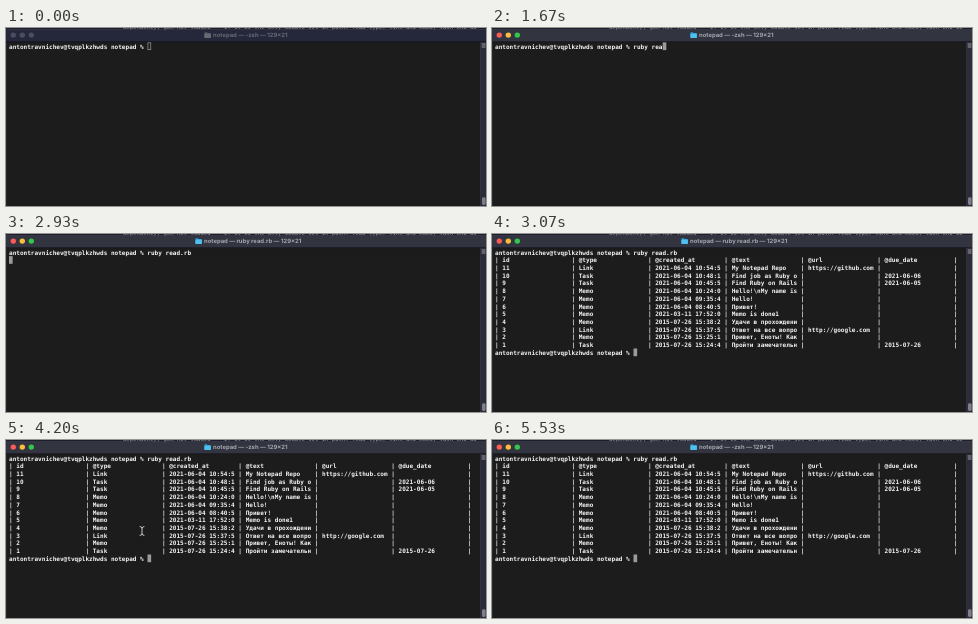
These frames come from a looping animation (480 by 178 pixels, 6.14 s). An HTML page:

```html
<!DOCTYPE html>
<html lang="en">
<head>
<meta charset="utf-8">
<title>Terminal session</title>
<style>
  html, body { margin: 0; width: 100%; height: 100%; overflow: hidden; background: #1c1c1c; }
  svg { display: block; width: 480px; height: 178px; }
  text { white-space: pre; text-rendering: geometricPrecision; }
  .mono { font: 700 6.055px "DejaVu Sans Mono", monospace; fill: #f4f4f4; }
  .title { font: 700 5.9px Inter, sans-serif; }
  .behind { font: 5.6px "DejaVu Sans Mono", monospace; fill: #9a9aa4; }
</style>
</head>
<body>
<svg id="stage" viewBox="0 0 480 178">
  <rect width="480" height="178" fill="#1c1c1c"/>
  <rect id="bar" width="480" height="14"/>
  <rect width="480" height="1.4" fill="#1d1e2a"/>
  <text class="behind" x="117" y="0.9">dependency, gem not loaded    if it is the only module set in path: read type, link and memo, task end do</text>
  <rect y="1.3" width="480" height="0.6" fill="#3d3f51"/>
  <rect y="13.4" width="480" height="0.7" fill="#11121a"/>
  <rect y="14" width="1" height="164" fill="#26272d"/>
  <rect x="474.5" y="14" width="5.5" height="164" fill="#2b2c39"/>
  <rect x="474.3" y="14" width="0.6" height="164" fill="#3b3b44"/>
  <rect x="475.7" y="15" width="3.8" height="5" fill="#62636d"/>
  <rect x="476" y="169.3" width="3.6" height="7.7" rx="1.4" fill="#7f8089"/>
  <g id="lights"></g>
  <g id="folder">
    <path d="M0 1.1q0-.7.7-.7h1.7l.8.8h2.6q.7 0 .7.7v3.5q0 .7-.7.7H.7q-.7 0-.7-.7z" fill="#2c9fd6"/>
    <rect y="2" width="6.5" height="4.1" rx="0.6" fill="#4fc0ee"/>
  </g>
  <text id="title" class="title" y="9.3"></text>
  <g id="lines"></g>
  <rect id="cursor" stroke-width="0.7"/>
  <g id="pointer" fill="none" stroke-linecap="round">
    <path d="M-2-4.4Q0-4.4 0-3V3Q0 4.4-2 4.4M2-4.4Q0-4.4 0-3M0 3Q0 4.4 2 4.4" stroke="#111" stroke-width="1.9"/>
    <path d="M-2-4.4Q0-4.4 0-3V3Q0 4.4-2 4.4M2-4.4Q0-4.4 0-3M0 3Q0 4.4 2 4.4" stroke="#e2e2e2" stroke-width="0.9"/>
  </g>
</svg>
<script>
const LOOP = 6140, CHAR = 3.645, LEFT = 3, TOP = 14.4, LINE = 7.7;
const FOCUS = 130, ENTER = 2800, RUN = 2870, OUTPUT = 3070, DONE = 3130;
const $ = id => document.getElementById(id);
const prompt = "antontravnichev@tvqplkzhwds notepad % ";
const command = "ruby read.rb";
const keyTimes = [730, 930, 1000, 1130, 1200, 1400, 1470, 1670, 1730, 2070, 2470, 2530];

const records = [
  ["id", "@type", "@created_at", "@text", "@url", "@due_date"],
  ["11", "Link", "2021-06-04 10:54:5", "My Notepad Repo", "https://github.com"],
  ["10", "Task", "2021-06-04 10:48:1", "Find job as Ruby o", "", "2021-06-06"],
  ["9", "Task", "2021-06-04 10:45:5", "Find Ruby on Rails", "", "2021-06-05"],
  ["8", "Memo", "2021-06-04 10:24:0", "Hello!\\nMy name is"],
  ["7", "Memo", "2021-06-04 09:35:4", "Hello!"],
  ["6", "Memo", "2021-06-04 08:40:5", "Привет!"],
  ["5", "Memo", "2021-03-11 17:52:0", "Memo is done1"],
  ["4", "Memo", "2015-07-26 15:38:2", "Удачи в прохождени"],
  ["3", "Link", "2015-07-26 15:37:5", "Ответ на все вопро", "http://google.com"],
  ["2", "Memo", "2015-07-26 15:25:1", "Привет, Еноты! Как"],
  ["1", "Task", "2015-07-26 15:24:4", "Пройти замечательн", "", "2015-07-26"]
];
const formatRow = r =>
  "| " + Array.from({ length: 6 }, (_, i) => (r[i] || "").padEnd(18)).join(" | ") + " |";
const table = records.map(formatRow);

// Pointer path: [time, x, y]
const path = [
  [3730, 243, 127], [3930, 209, 118], [4070, 173, 108], [4200, 136, 91],
  [4330, 78.5, 58], [4400, 66, 47], [4470, 62, 43.5], [5270, 64, 44.5],
  [5330, 110, 62], [5400, 225, 99], [5470, 468, 162]
];

function add(parent, tag, attrs) {
  const el = document.createElementNS("http://www.w3.org/2000/svg", tag);
  for (const k in attrs) el.setAttribute(k, attrs[k]);
  return parent.appendChild(el);
}
const set = (el, attrs) => { for (const k in attrs) el.setAttribute(k, attrs[k]); };

const lightColors = ["#fc5b57", "#fdbc40", "#34c84a"];
const lights = lightColors.map((_, i) => add($("lights"), "circle", { cx: 7.3 + 9 * i, cy: 7.1, r: 2.7 }));
const lineEls = Array.from({ length: table.length + 2 }, (_, i) =>
  add($("lines"), "text", { class: "mono", x: LEFT, y: TOP + 6.2 + LINE * i }));

function setLine(i, s) {
  if (lineEls[i].textContent !== s) lineEls[i].textContent = s;
}

function pointerAt(t) {
  if (t >= FOCUS && t < keyTimes[0]) return [255.5, 132.5];
  if (t < path[0][0] || t >= 5530) return null;
  // The picture advances in steps of a fifteenth of a second.
  const step = Math.floor((t + 4) * 15 / 1000) * 1000 / 15;
  const s = Math.max(step, path[0][0]);
  const i = path.findIndex(p => p[0] > s);
  if (i < 0) return path[path.length - 1].slice(1);
  const [t0, x0, y0] = path[i - 1], [t1, x1, y1] = path[i];
  if (t0 === 4470) return [x0, y0];
  const k = (s - t0) / (t1 - t0);
  return [x0 + (x1 - x0) * k, y0 + (y1 - y0) * k];
}

function drawTitleBar(t) {
  const focused = t >= FOCUS;
  const running = t >= RUN && t < DONE;
  const x = running ? 198 : 207;
  set($("bar"), { fill: focused ? "#32343f" : "#25273a" });
  lights.forEach((el, i) => el.setAttribute("fill", focused ? lightColors[i] : "#4b4d60"));
  $("title").textContent = `notepad — ${running ? command : "-zsh"} — 129×21`;
  set($("title"), { x, fill: focused ? "#a6a7af" : "#686a77" });
  set($("folder"), {
    transform: `translate(${x - 8.6} 3.8)`,
    opacity: focused ? 1 : 0.5,
    style: focused ? "" : "filter: grayscale(1)"
  });
}

function drawCursor(t, row, col) {
  const focused = t >= FOCUS;
  const inset = focused ? 0 : 0.4;
  set($("cursor"), {
    x: LEFT + CHAR * col + inset, y: TOP + LINE * row + inset,
    width: CHAR - 2 * inset, height: LINE - 2 * inset,
    fill: focused ? "#9b9b9b" : "none", stroke: focused ? "none" : "#9b9b9b"
  });
}

function render(t) {
  drawTitleBar(t);

  const typed = command.slice(0, keyTimes.filter(k => k <= t).length);
  const done = t >= OUTPUT;
  setLine(0, prompt + typed);
  table.forEach((row, i) => setLine(i + 1, done ? row : ""));
  setLine(table.length + 1, done ? prompt : "");

  if (done) drawCursor(t, table.length + 1, prompt.length);
  else if (t >= ENTER) drawCursor(t, 1, 0);
  else drawCursor(t, 0, prompt.length + typed.length);

  const p = pointerAt(t);
  set($("pointer"), p
    ? { transform: `translate(${p[0]} ${p[1]})`, visibility: "visible" }
    : { visibility: "hidden" });
}

const start = performance.now();
function tick(now) {
  render(Math.max(0, now - start) % LOOP);
  requestAnimationFrame(tick);
}
render(0);
requestAnimationFrame(tick);
</script>
</body>
</html>
```
